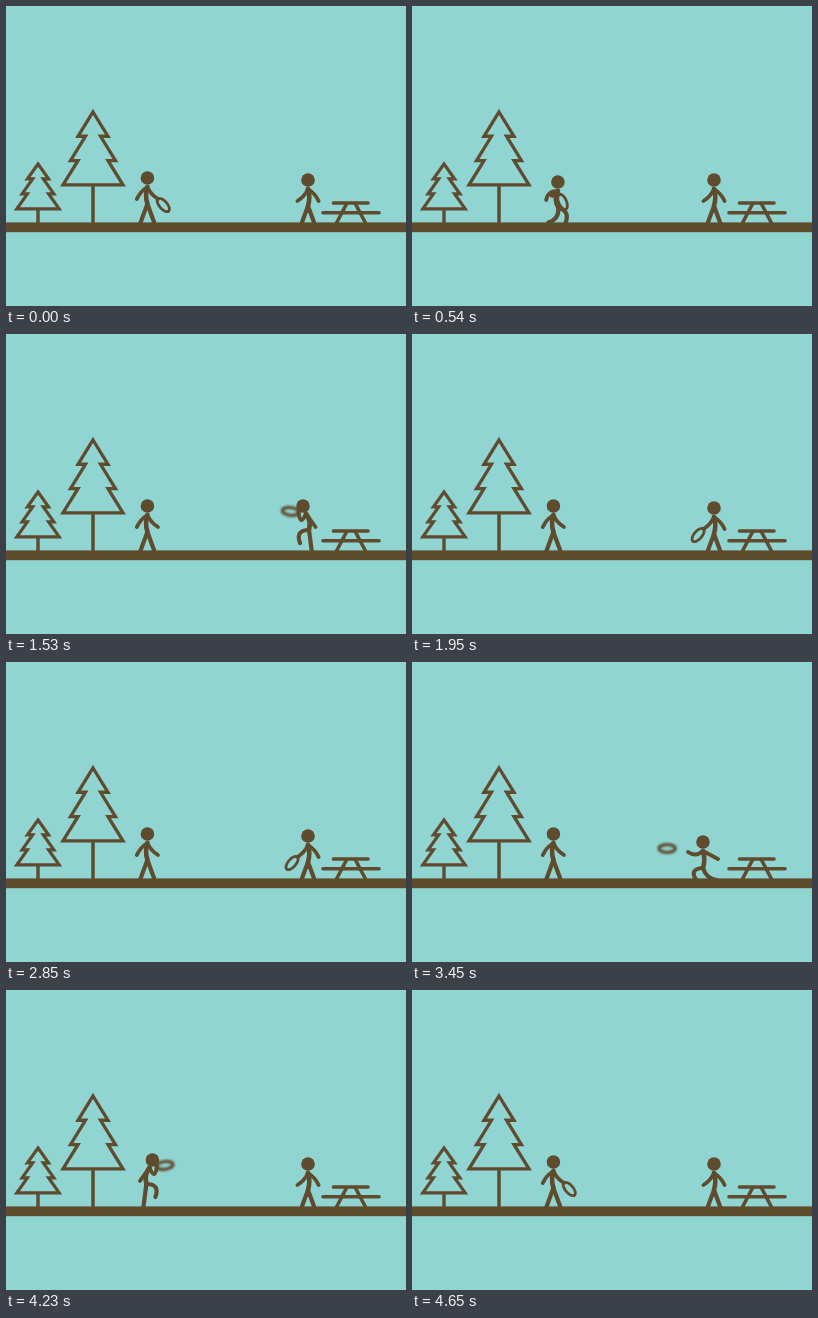
Recreate the animation shown at these times as an HTML page with a canvas. Size 400x300 px, loop 5430 ms.

```html
<!DOCTYPE html>
<html lang="en">
<head>
<meta charset="utf-8">
<title>Disc toss</title>
<style>
html, body { margin: 0; width: 100%; height: 100%; overflow: hidden; background: #91d5d3; }
canvas { display: block; width: 400px; height: 300px; }
</style>
</head>
<body>
<canvas id="stage" width="400" height="300"></canvas>
<script>
const ctx = document.getElementById('stage').getContext('2d');
const SKY = '#91d5d3', BROWN = '#5f4b2d';
const LOOP = 5430, STEP = 30, LEFT_START = 120, RIGHT_START = 2850;
const GROUND = 217, LEFT_X = 141.4, RIGHT_X = 302;
const RELEASE = 540, CATCH_AT = 1210;

// Poses face left, measured from the ground between the feet; head is relative to the neck
const STAND = {
  head: [0, -9], neck: [0, -34], hip: [0, -17],
  handF: [-10.6, -22], handB: [10.6, -22], footF: [-7, 2], footB: [7, 2]
};
const WIND = { ...STAND, neck: [2, -32], hip: [1, -16], handF: [14, -26] };
const THROW = {
  ...STAND, neck: [-11, -28], hip: [-11, -11],
  handF: [-26, -27], handB: [4, -20], footF: [-17, 2], footB: [3, 1]
};
const CROUCH = {
  ...STAND, head: [-7, -7.5], neck: [-1, -27.5], hip: [-2, -11],
  handF: [-9, -15.5], handB: [9, -15.5], footF: [-9.5, 2], footB: [0, 2]
};
const CATCH = {
  ...STAND, head: [-3, -7.5], neck: [-2, -37.5], hip: [1, -21],
  handF: [-9.5, -38.5], handB: [7.5, -24], footF: [-8, -8], footB: [4, 2]
};
const LEAP = { ...mapPose(CATCH, ([x, y], part) => [x, part === 'head' ? y : y - 13]), handF: [-15, -58] };

const THROWER = [[0, STAND], [300, WIND], [RELEASE, THROW], [620, THROW], [960, STAND]];
const CATCHER = [[600, STAND], [830, CROUCH], [930, CROUCH], [CATCH_AT, LEAP], [1370, CATCH], [1470, CATCH], [1790, STAND]];

function mapPose(pose, fn) {
  return Object.fromEntries(Object.entries(pose).map(([part, pt]) => [part, fn(pt, part)]));
}

const clamp = v => Math.min(1, Math.max(0, v));
const mix = (a, b, s) => a.map((v, i) => v + (b[i] - v) * s);

function poseAt(keys, t) {
  let pose = keys[0][1];
  for (let i = 1; i < keys.length && t > keys[i - 1][0]; i++) {
    const [from, a] = keys[i - 1], [to, b] = keys[i];
    const p = clamp((t - from) / (to - from)), s = p * p * (3 - 2 * p);
    pose = mapPose(a, (pt, part) => mix(pt, b[part], s));
  }
  return pose;
}

function line(width, ...pts) {
  ctx.lineWidth = width;
  ctx.beginPath();
  for (let i = 0; i < pts.length; i += 2) ctx.lineTo(pts[i], pts[i + 1]);
  ctx.stroke();
}

// Three tiers; each upper one ends in a notch half as wide as the tier below
function tree(x, top, base, half, width) {
  const side = [];
  for (let tier = 1; tier <= 3; tier++) {
    const y = top + (base - top) * tier / 3;
    side.push([half * (1 + tier) / 4, y]);
    if (tier < 3) side.push([half * tier / 4, y]);
  }
  ctx.lineCap = 'butt';
  ctx.lineJoin = 'miter';
  ctx.lineWidth = width;
  ctx.beginPath();
  ctx.moveTo(x, top);
  for (const [dx, y] of side) ctx.lineTo(x + dx, y);
  for (const [dx, y] of side.reverse()) ctx.lineTo(x - dx, y);
  ctx.closePath();
  ctx.stroke();
  line(width + 0.2, x, base, x, GROUND + 1);
}

function table(x) {
  ctx.lineCap = 'round';
  line(3.6, x - 17.5, 197, x + 17, 197);
  line(3.6, x - 28, 206.7, x + 28, 206.7);
  for (const side of [-1, 1]) line(3.6, x + side * 4.5, 198, x + side * 14.5, 217);
}

// Two equal bones from a to b, bent to one side and drawn as a curve
function limb(a, b, bone, side, width) {
  const dx = b[0] - a[0], dy = b[1] - a[1], d = Math.hypot(dx, dy);
  const bulge = 2 * side * Math.sqrt(Math.max(0, bone * bone - d * d / 4)) / d;
  ctx.lineWidth = width;
  ctx.beginPath();
  ctx.moveTo(...a);
  ctx.quadraticCurveTo((a[0] + b[0]) / 2 + dy * bulge, (a[1] + b[1]) / 2 - dx * bulge, ...b);
  ctx.stroke();
}

function figure(p, spot) {
  ctx.save();
  ctx.translate(spot.x, spot.y);
  ctx.scale(spot.facing, 1);
  ctx.lineCap = 'round';
  limb(p.neck, p.hip, 8.6, 1, 4.6);
  limb(p.neck, p.handF, 8.1, 1, 3.8);
  limb(p.neck, p.handB, 8.1, 1, 3.8);
  limb(p.hip, p.footF, 9.7, -1, 4.2);
  limb(p.hip, p.footB, 9.7, -1, 4.2);
  ctx.beginPath();
  ctx.arc(p.neck[0] + p.head[0], p.neck[1] + p.head[1], 6.8, 0, 2 * Math.PI);
  ctx.fill();
  ctx.restore();
}

// A held disc continues the line of the front arm: x, y, tilt
function held(p, spot) {
  const dx = p.handF[0] - p.neck[0], dy = p.handF[1] - p.neck[1];
  const reach = 8 / Math.hypot(dx, dy);
  return [
    spot.x + spot.facing * (p.handF[0] + dx * reach),
    spot.y + p.handF[1] + dy * reach,
    spot.facing * Math.atan2(dy, dx)
  ];
}

function flight(p, thrower, catcher) {
  const a = held(THROW, thrower), b = held(LEAP, catcher);
  const glide = k => 1 - (1 - p) ** k;
  const tilt = Math.atan(Math.tan(b[2])) * p ** 6;
  return [a[0] + (b[0] - a[0]) * glide(1.4), a[1] + (b[1] - a[1]) * glide(1.2), tilt];
}

function disc([x, y, tilt], blur) {
  ctx.save();
  if (blur) ctx.filter = `blur(${blur.toFixed(2)}px)`;
  ctx.translate(x, y);
  ctx.rotate(tilt);
  ctx.lineWidth = 2.8 + blur * 0.5;
  ctx.beginPath();
  ctx.ellipse(0, 0, 8.2, 3.9, 0, 0, 2 * Math.PI);
  ctx.stroke();
  ctx.restore();
}

function toss(u, leftY, rightY) {
  const thrower = { x: LEFT_X, y: leftY, facing: -1 };
  const catcher = { x: RIGHT_X, y: rightY, facing: 1 };
  const throwing = poseAt(THROWER, u), catching = poseAt(CATCHER, u);
  figure(throwing, thrower);
  figure(catching, catcher);
  if (u < RELEASE) disc(held(throwing, thrower), 0);
  else if (u < CATCH_AT) disc(flight((u - RELEASE) / (CATCH_AT - RELEASE), thrower, catcher), 0.8);
  else disc(held(catching, catcher), clamp((1790 - u) / 320));
}

function draw(t) {
  ctx.fillStyle = SKY;
  ctx.fillRect(0, 0, 400, 300);
  ctx.fillStyle = ctx.strokeStyle = BROWN;
  tree(87, 106, 178.8, 30, 3.3);
  tree(32, 158, 202.8, 21.2, 3.2);
  table(345);
  ctx.save();
  if (t < RIGHT_START) {
    toss(t - LEFT_START, GROUND - 2, GROUND);
  } else {
    // The return throw is the same action seen in a mirror
    ctx.translate(LEFT_X + RIGHT_X, 0);
    ctx.scale(-1, 1);
    toss(t - RIGHT_START, GROUND, GROUND - 2);
  }
  ctx.restore();
  ctx.fillRect(0, 216.4, 400, 9.8);
}

const start = performance.now();
function tick() {
  const t = (performance.now() - start) % LOOP;
  draw(Math.floor(t / STEP) * STEP);
  requestAnimationFrame(tick);
}
tick();
</script>
</body>
</html>
```
